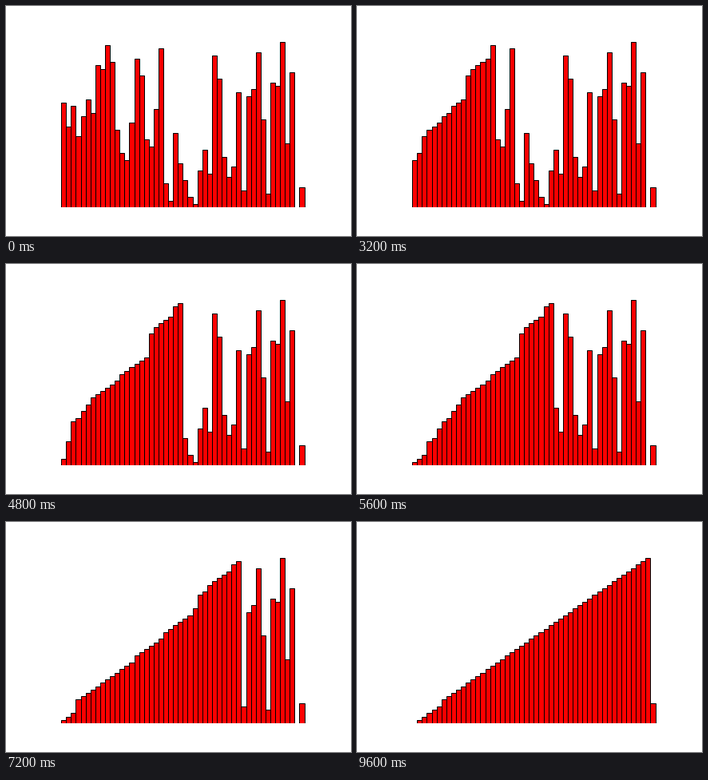
These frames come from a looping animation (432x288 px, 9800 ms). A matplotlib script:

```python
import matplotlib.pyplot as plt
from matplotlib.animation import FuncAnimation

WIDTH, HEIGHT, DPI = 432, 288, 72
FRAMES, INTERVAL = 49, 200

VALUES = [
    31, 24, 30, 21, 27, 32, 28, 42, 41, 48,
    43, 23, 16, 14, 25, 44, 39, 20, 18, 29,
    47, 7, 2, 22, 13, 8, 3, 1, 11, 17,
    10, 45, 38, 15, 9, 12, 34, 5, 33, 35,
    46, 26, 4, 37, 36, 49, 19, 40, 0, 6,
]
COUNT = len(VALUES)


def insertion_state(step):
    """Values after the items up to index `step` have been inserted in order."""
    return sorted(VALUES[:step + 1]) + VALUES[step + 1:]


fig = plt.figure(figsize=(WIDTH / DPI, HEIGHT / DPI), dpi=DPI, facecolor="white")
fig.subplots_adjust(left=0.125, right=0.9, bottom=0.125, top=0.88)
ax = fig.add_subplot()
ax.axis("off")

bars = ax.bar(range(COUNT), VALUES, width=1, align="edge",
              color="#ff0000", edgecolor="black", linewidth=1)
ax.set_xlim(-0.05 * COUNT, 1.05 * COUNT)
ax.set_ylim(0, 1.05 * max(VALUES))


def update(step):
    for bar, value in zip(bars, insertion_state(step)):
        bar.set_height(value)
    return list(bars)


anim = FuncAnimation(fig, update, frames=FRAMES, interval=INTERVAL,
                     repeat=True, repeat_delay=0, blit=False)
plt.show()
```
